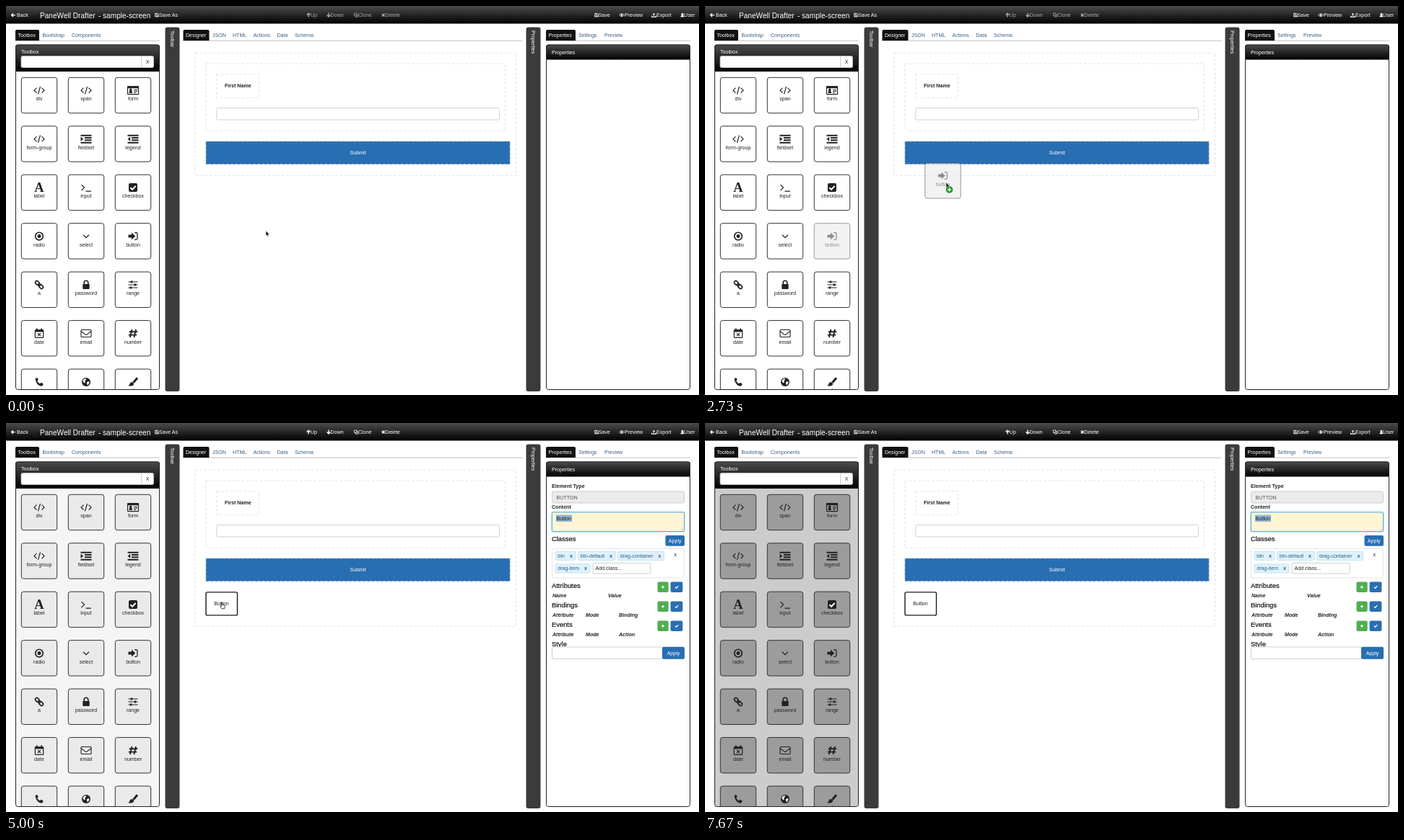
These frames come from a looping animation (960 px wide and 540 px high, 8000 ms). An HTML page:

```html
<!DOCTYPE html>
<html lang="en">
<head>
<meta charset="utf-8">
<title>Screen designer</title>
<style>
  html, body { margin: 0; height: 100%; overflow: hidden; background: #fff; }
  svg { display: block; width: 100vw; height: 100vh; font: 7.1px "Liberation Sans", Arial, sans-serif; fill: #222; --shade: 0; }
  text { white-space: pre; }
  .line { fill: none; stroke: #222; }
  .mid { text-anchor: middle; }
  .bold { font-weight: bold; }
  .head { font-size: 9.4px; fill: #111; stroke: #111; stroke-width: .2px; }
  .sub { font-weight: bold; font-style: italic; }
  .white { fill: #fff; }
  .link { fill: #3d5f83; }
  .bar { fill: #fff; }
  .bar .line { stroke: #fff; }
  .edit { opacity: .6; }
  .dash { fill: none; stroke: #e3e3e3; stroke-width: 1.1; stroke-dasharray: 3.5 2.7; }
  .dash.dark { stroke: #1c1c1c; stroke-width: 1.4; }
  .field { fill: #fff; stroke: #c4c4c4; stroke-width: .8; }
  .blue { fill: #286eb2; }
  .green { fill: #4fae50; }
  .tag { fill: #e0f1fb; stroke: #b9dcee; stroke-width: .7; }
  .tagText { fill: #2a6287; }
  .body { fill: rgb(0 0 0 / calc(.2 * var(--shade))); }
  .tile > rect { fill: rgb(0 0 0 / calc(.235 * var(--shade))); stroke: #333; }
  .tile.hover > rect { fill: #e7e7e7; }
  .tile.faded { opacity: .5; }
</style>
</head>
<body>
<svg id="stage" viewBox="0 0 960 540"></svg>
<script>
const stage = document.getElementById('stage');

const text = (x, y, str, cls = '', more = '') => `<text x="${x}" y="${y}" class="${cls}" ${more}>${str}</text>`;
const rect = (x, y, w, h, more = '', r = 0) => `<rect x="${x}" y="${y}" width="${w}" height="${h}" rx="${r}" ${more}/>`;
const cls = name => `class="${name}"`;
const fill = (d, color = '') => `<path d="${d}" ${color && `fill="${color}"`}/>`;
const line = (d, width = 1.2, color = '') =>
  `<path d="${d}" class="line" stroke-width="${width}" ${color && `style="stroke:${color}"`}/>`;
const at = (x, y, content, more = '') => `<g transform="translate(${x} ${y})" ${more}>${content}</g>`;

// Toolbox icons, centred on the origin
const code = line('M-3.5-3.5L-7 0l3.5 3.5M3.5-3.5L7 0l-3.5 3.5M1.5-5.2L-1.5 5.2');
const rows = line('M-7.5-5h15M-2-1.7h9.5M-2 1.7h9.5M-7.5 5h15', 2);
const link = (x, y) => rect(x - 3.2, y - 2.1, 6.4, 4.2, 'class="line" stroke-width="1.7"', 2);
const tools = [
  ['div', code],
  ['span', code],
  ['form', rect(-7.5, -5.5, 15, 11, 'class="line" stroke-width="1.2"', 1) + fill('M-8-6H8v3H-8zM-5.5 3.7v-2l1.2-1a1.8 1.8 0 1 1 2.1 0l1.2 1v2z') + line('M1-.8h5M1 1.2h5M1 3.2h3', 1)],
  ['form-group', code],
  ['fieldset', rows + fill('M-7.5-3.2L-3.8 0l-3.7 3.2z')],
  ['legend', rows + fill('M-3.8-3.2L-7.5 0l3.7 3.2z')],
  ['label', text(0, 6.3, 'A', 'mid bold', 'style="font-family:\'Liberation Serif\',serif;font-size:18.5px"')],
  ['input', line('M-6.5-4l4 4-4 4M-.5 5h7.5')],
  ['checkbox', rect(-6, -6, 12, 12, '', 2) + line('M-3.7 0l2.7 2.7L3.7-2.2', 2, '#fff')],
  ['radio', '<circle r="5.3" class="line" stroke-width="1.7"/><circle r="2.5"/>'],
  ['select', line('M-4-1.8L0 2.2l4-4')],
  ['button', fill('M-6.5-2h4.5v-3L3.2 0-2 5V2h-4.5z') + line('M2.2-4.8h2.2q1.5 0 1.5 1.5v6.6q0 1.5-1.5 1.5H2.2', 1.3)],
  ['a', `<g transform="rotate(45)">${link(-3.6, 0) + link(3.6, 0)}</g>` + line('M-1.8-1.8L1.8 1.8', 1.4)],
  ['password', rect(-4.7, -1, 9.4, 7, '', 1) + line('M-2.8-1v-2a2.8 2.8 0 0 1 5.6 0v2', 1.6)],
  ['range', line('M-6.5-4h13M-6.5 0h13M-6.5 4h13') + line('M-2-5.5v3M3-1.5v3M-3 2.5v3', 2.6)],
  ['date', rect(-5.7, -4.5, 11.4, 10.5, 'class="line" stroke-width="1.2"', 1) + fill('M-6-5H6v3H-6z') + line('M-3.2-7v3M3.2-7v3', 1.8) + line('M-2-.3l4 4M2-.3l-4 4')],
  ['email', rect(-7, -5, 14, 10, 'class="line" stroke-width="1.1"', 1) + line('M-7-3L-1 1.7q1 .8 2 0L7-3', 1.1)],
  ['number', line('M-1.5-5.5l-2.6 11M4-5.5l-2.6 11M-5.2-2.2H6.2M-6.2 2.2H5.2', 1.9)],
  ['tel', fill('M-5.5-4.5q1-1.5 2.7-1.5l1.6 3-1.6 1.6q1.4 2.7 3.8 3.8l1.7-1.5 3 1.8q-.2 2.5-2.8 3.2-6.8-1.4-8.4-10.4z')],
  ['url', '<circle r="6"/>' + fill('M-4-3q2-2 4-1.5L-.5-2.5-2-1.5l1 1.5-1.5 1.5-2-2.5zM1 0l3-1 .5 2-2 3-1.5-1z', '#fff')],
  ['color', line('M6-5.7L.5.8', 3) + fill('M-1.6.2Q1 .8 1.2 3-.2 6.4-6.8 5.4-4.6 4-4.4 2-3.6.2-1.6.2z')],
];
const tileX = i => 21 + 65 * (i % 3);
const tileY = i => 99 + 67.45 * Math.floor(i / 3);
const tile = (i, id = '', state = '') => at(tileX(i), tileY(i),
  rect(.3, .3, 49.4, 49.4, '', 3) + at(25, 18.2, tools[i][1]) + text(25, 32.3, tools[i][0], 'mid'),
  `${id && `id="${id}"`} class="tile ${state}"`);
const buttonTile = 11;

// Menu icons, centred on the origin
const arrow = angle => `<g transform="rotate(${angle})">${line('M0 3V-2M-2.4 0L0-2.4 2.4 0', 1.4)}</g>`;
const floppy = line('M-2.3-2.3H1.3l1 1v3.6h-4.6zM-1-2.3v1.4h1.9M-1.2 2.3V.8h2.4v1.5', .8);
const menuItem = (x, icon, label, textX) => at(x, 12.6, icon) + text(textX, 15.2, label);
const menu = `<g class="bar">${[
  [10, arrow(-90), 'Back', 15],
  [209, floppy, 'Save As', 212],
  [818, floppy, 'Save', 820.5],
  [853, line('M-3.4 0Q0-4 3.4 0 0 4-3.4 0z', .8) + '<circle r="1.3"/>', 'Preview', 857],
  [897.5, line('M-3 .8v1.7h6V.8', 1.1) + line('M0 1.3v-3.5M-1.7-.8L0-2.5 1.7-.8', 1), 'Export', 901],
  [937, '<circle cy="-1.2" r="1.6"/>' + fill('M-2.6 2.7Q-2.6.3 0 .5 2.6.3 2.6 2.7z'), 'User', 939.3],
].map(item => menuItem(...item)).join('')}
  ${text(47, 16.5, 'PaneWell Drafter', '', 'font-size="10.1"')}${text(127.9, 16.5, '- sample-screen', '', 'font-size="10.1"')}
  <g id="edit" class="edit">${[
    [419, arrow(0), 'Up', 421.8],
    [447, arrow(180), 'Down', 449.6],
    [485, line('M-2.6-2.6h3.4v3.4h-3.4zM-.8.8v1.8h3.4v-3.4H.8', .8), 'Clone', 488],
    [522.7, line('M-1.8-1.8l3.6 3.6M1.8-1.8l-3.6 3.6', 1.5), 'Delete', 525.3],
  ].map(item => menuItem(...item)).join('')}</g></g>`;

const tabs = (x, width, active, labels) =>
  line(`M${x} 48.2h${width}`, .8, '#a9b4b8') +
  fill(`M${x} 48V35q0-2 2-2h${active - 4}q2 0 2 2v13z`, '#111') +
  labels.map(([tx, label], i) => text(tx, 43, label, i ? 'link' : 'white')).join('');

const sideBar = (x, label) => rect(x, 29.5, 20, 505.5, 'fill="#3b3b3b"', 3) +
  at(x + 7.3, 34, text(0, 0, label, 'white').replace('<text', '<text transform="rotate(90)"'));

const panel = (x, headHeight, label, labelY) =>
  fill(`M${x} ${54 + headHeight}V56.5q0-3 3-3h194q3 0 3 3v${headHeight - 2.5}z`, 'url(#dark)') +
  rect(x + .5, 54, 199, 478.5, 'class="line" stroke-width="1"', 3) + text(x + 8, labelY, label, 'white');

const toolbox = rect(13.5, 91, 199, 441, cls('body')) +
  `<g clip-path="url(#toolClip)">${tools.map((_, i) => tile(i, i === buttonTile ? 'source' : '')).join('')}</g>` +
  panel(13, 37, 'Toolbox', 66.3) +
  rect(21, 69.5, 183.5, 16, cls('field'), 2) + line('M187.7 69.5v16', .8, '#bbb') + text(196, 80, 'X', 'mid');

const designer = rect(262, 65.2, 444.5, 170.3, 'id="form" class="dash"') +
  rect(277, 80, 414.5, 93, cls('dash')) + rect(291.8, 95, 59, 32.3, cls('dash')) +
  text(303, 113.3, 'First Name', 'bold') + rect(291.8, 141.6, 391.8, 16.4, cls('field'), 2) +
  rect(276.8, 187.8, 421.5, 32, cls('blue')) +
  rect(276.8, 187.8, 421.5, 32, 'class="dash" style="stroke:#d3dfea"') +
  text(487.5, 206.2, 'Submit', 'mid white') +
  `<g id="dropped">${rect(277, 234.9, 43.5, 32, 'id="buttonBox" class="dash"', 2)}${text(298.5, 253.3, 'Button', 'mid')}</g>`;

const tag = (x, y, width, label) => rect(x, y, width, 12.3, cls('tag'), 1.5) +
  text(x + 3.2, y + 8.6, label, 'tagText') + text(x + width - 8, y + 8.4, 'x', 'tagText bold');
const section = (y, title, columns) => text(756, y, title, 'head') +
  rect(902.5, y - 8, 15.2, 14.6, cls('green'), 2) + rect(920.6, y - 8, 16.8, 14.6, cls('blue'), 2) +
  at(910, y - .8, line('M-2 0h4M0-2v4', 1.2, '#fff')) + at(929, y - .8, line('M-2 0l1.5 1.6L2.2-1.6', 1.3, '#fff')) +
  columns.map(([x, label]) => text(x, y + 13.5, label, 'sub')).join('');

const properties = `<g id="properties">
  ${text(756, 89.5, 'Element Type', 'bold')}${rect(756.5, 95, 183, 16, 'class="field" style="fill:#ebebeb"', 2)}
  ${text(762.5, 105.5, 'BUTTON', '', 'fill="#555"')}${text(756, 119, 'Content', 'bold')}
  ${rect(756, 123.5, 184, 27.5, 'fill="none" stroke="#bfe3f2" stroke-width="2"', 2)}
  ${rect(756.5, 124, 183, 26.5, 'fill="#fff4d4" stroke="#62b4d8"', 2)}
  ${rect(762, 127.6, 22, 9.4, 'fill="#91b4d3"')}${text(762.5, 134.9, 'Button')}${line('M935 149.3l3.5-3.5M937 149.3l1.5-1.5', .5, '#999')}
  ${text(756, 164, 'Classes', 'head')}${rect(913.5, 156, 26.5, 14.7, cls('blue'), 2)}${text(926.7, 165.7, 'Apply', 'mid white')}
  ${rect(756.5, 174.5, 183, 40.5, 'class="field" style="stroke:#ddd"', 2)}
  ${tag(761, 178.2, 28, 'btn')}${tag(792.6, 178.2, 51.5, 'btn-default')}${tag(847.6, 178.2, 64, 'drag-container')}${tag(761, 195.8, 48, 'drag-item')}
  ${rect(813.3, 194.5, 79.5, 14.5, cls('field'), 1)}${text(816.5, 204.3, 'Add class...')}${text(927.3, 185.3, 'x', 'mid')}
  ${section(228.5, 'Attributes', [[757, 'Name'], [834, 'Value']])}
  ${section(255.5, 'Bindings', [[757, 'Attribute'], [803, 'Mode'], [849, 'Binding']])}
  ${section(282.5, 'Events', [[757, 'Attribute'], [803, 'Mode'], [849, 'Action']])}
  ${text(756, 309.5, 'Style', 'head')}${rect(756.5, 311, 153, 16.5, cls('field'), 2)}
  ${rect(909, 310.8, 31, 16.9, cls('blue'), 2)}${text(924.5, 321.8, 'Apply', 'mid white')}</g>`;

const cursor = `<g id="cursor">
  <path id="arrow" d="M0 0V7.2L1.6 5.7 2.7 8.2 3.9 7.7 2.8 5.2H5z" fill="#111" stroke="#fff" stroke-width=".5"/>
  <path id="hand" d="M-1.6 4V.3Q-1-.7-.4.3V3.2L2.7 4Q3.6 4.3 3.4 5.6L2.7 8.8H-1.3L-3.3 5.4Q-3.2 4.3-1.6 5.4z" fill="#fff" stroke="#111" stroke-width=".8"/>
  <g id="plus" transform="translate(4.5 10)"><circle r="4.8" fill="#23962b"/>${line('M-2.6 0h5.2M0-2.6v5.2', 1.4, '#fff')}</g></g>`;

stage.innerHTML = `<defs>
  <linearGradient id="dark" x2="0" y2="1"><stop stop-color="#4c4c4c"/><stop offset="1" stop-color="#000"/></linearGradient>
  <clipPath id="toolClip">${rect(13, 91, 200, 441)}</clipPath></defs>
  ${rect(0, 0, 960, 24.5, 'fill="url(#dark)"')}${menu}
  ${tabs(13, 200, 33, [[16.5, 'Toolbox'], [50.5, 'Bootstrap'], [91, 'Components']])}
  ${tabs(245.5, 470.5, 36, [[249, 'Designer'], [286, 'JSON'], [314, 'HTML'], [342.5, 'Actions'], [375.5, 'Data'], [400, 'Schema']])}
  ${tabs(748, 200, 41, [[751.5, 'Properties'], [793, 'Settings'], [829, 'Preview']])}
  ${sideBar(220.5, 'Toolbar')}${sideBar(720.5, 'Properties')}
  ${toolbox}${designer}${panel(748, 20.5, 'Properties', 66.5)}${properties}
  <g id="ghost">${tile(buttonTile, '', 'hover faded')}</g>${cursor}`;

const parts = Object.fromEntries([...stage.querySelectorAll('[id]')].map(el => [el.id, el]));
const show = (el, on) => { el.style.display = on ? '' : 'none'; };
const move = (el, x, y) => el.setAttribute('transform', `translate(${x} ${y})`);
const within = (x, y, left, top, right, bottom) => x > left && x < right && y > top && y < bottom;

const LOOP = 8000, DRAG = 1900, DROP = 3530, CLICK = 5000, LEAVE = 7640;
const grab = [180.5, 329];
// time, x, y; "linear" marks a steady move towards that point
const path = [
  [0, 360, 312], [270, 360, 312], [1070, 187, 326], [1810, 187, 326], [1930, ...grab],
  [2600, 326.5, 251], [2730, 334, 245, 'linear'], [3070, 347, 232, 'linear'], [3270, 349.5, 227.5],
  [4000, 349.5, 227.5], [4530, 300, 249], [7400, 300, 249], [7670, 770, 132], [LOOP, 770, 132],
];

function pointer(t) {
  const i = path.findIndex(p => p[0] > t);
  const [t0, x0, y0] = path[i - 1], [t1, x1, y1, steady] = path[i];
  const u = (t - t0) / (t1 - t0), k = steady ? u : u * u * (3 - 2 * u);
  return [x0 + (x1 - x0) * k, y0 + (y1 - y0) * k];
}

function render(t) {
  const [x, y] = pointer(t);
  const dragging = t >= DRAG && t < DROP, dropped = t >= DROP, selected = t >= CLICK;
  const overTile = within(x, y, 151, 301, 201, 351);
  const overButton = dropped && within(x, y, 277, 235, 320, 267);
  const overForm = within(x, y, 262, 65, 706, dropped ? 282 : 235.5);
  const target = dragging && overForm;

  stage.style.setProperty('--shade', Math.min(1, Math.max(0, (t - CLICK + 50) / 250)) * selected);
  parts.source.setAttribute('class', `tile ${dragging ? 'hover faded' : overTile ? 'hover' : ''}`);
  parts.edit.style.opacity = selected ? 1 : '';

  parts.form.setAttribute('height', dropped ? 217 : 170.3);
  parts.form.classList.toggle('dark', target || dropped && !selected && overForm && !overButton);
  parts.form.style.fill = target ? '#dadcdb' : '';
  show(parts.dropped, dropped);
  parts.buttonBox.classList.toggle('dark', selected || overButton);
  parts.buttonBox.style.strokeDasharray = selected ? 'none' : '';
  show(parts.properties, selected);

  show(parts.ghost, dragging);
  move(parts.ghost, x - grab[0], y - grab[1]);
  show(parts.cursor, t < LEAVE);
  move(parts.cursor, x, y);
  show(parts.arrow, !overButton);
  show(parts.hand, overButton);
  show(parts.plus, dragging && x > 241);
}

function tick() {
  render(performance.now() % LOOP);
  requestAnimationFrame(tick);
}
tick();
</script>
</body>
</html>
```
